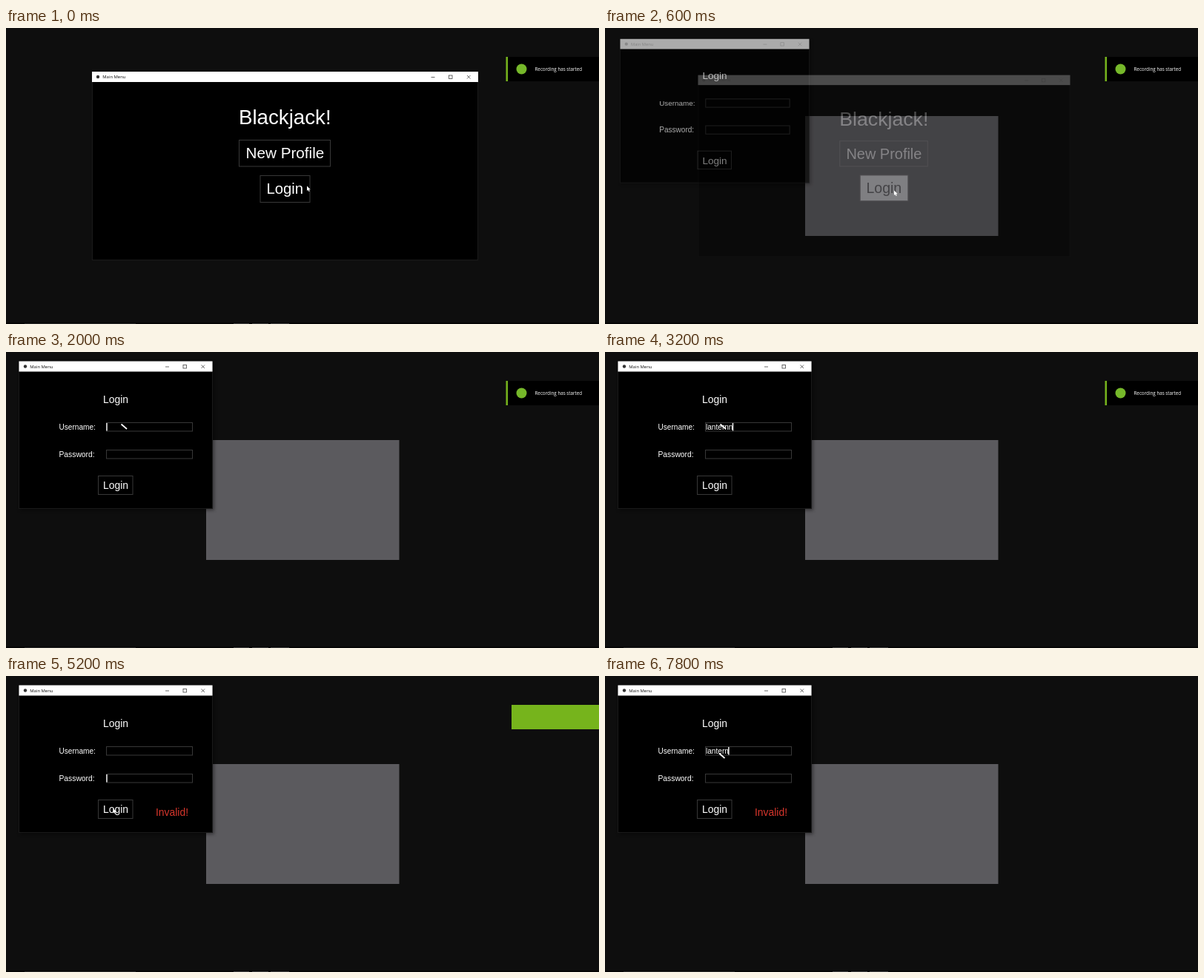
An HTML page for the animation above (8000 ms loop, 800 px wide and 400 px high).

```html
<!DOCTYPE html>
<html lang="en">
<head>
<meta charset="utf-8">
<title>Blackjack login</title>
<style>
  html, body { margin: 0; width: 100%; height: 100%; overflow: hidden; background: #0e0e0e; }
  svg { display: block; width: 800px; height: 400px; }
  text { font-family: "Liberation Sans", Arial, sans-serif; fill: #fff; white-space: pre; }
  .ui { font-family: "Open Sans", sans-serif; }
  .box { fill: #000; stroke: #383838; }
  .win { fill: #000; stroke: #1a1a1a; }
  .shade { filter: drop-shadow(2px 2px 2px rgba(0, 0, 0, .4)); }
</style>
</head>
<body>
<svg viewBox="0 0 800 400">
  <defs>
    <g id="controls" fill="none" stroke="#444" stroke-width=".8">
      <path d="M-63.500 7.500h5M-15 5l4.500 4.500m0-4.500l-4.500 4.500"/>
      <rect x="-39.500" y="5" width="4.500" height="4.500"/>
    </g>
    <g id="caption">
      <circle cx="8" cy="7" r="2.200" fill="#333"/>
      <text class="ui" x="14.300" y="9.200" font-size="5.900" style="fill:#111">Main Menu</text>
    </g>
  </defs>

  <rect width="800" height="400" fill="#0e0e0e"/>
  <rect y="398" width="800" height="2" fill="#050505"/>
  <path id="taskbar" d="M25 399.500h150" stroke="#282828"/>
  <path id="tasks" d="M307 399.500h21m4 0h22m3 0h25" stroke="#404040"/>
  <rect x="270" y="119" width="260.500" height="162" fill="#5b5a5e"/>

  <g id="login">
    <rect class="win shade" x="17.500" y="13" width="261" height="198.500"/>
    <rect x="17.500" y="12.500" width="261" height="14" fill="#fff"/>
    <g id="bar">
      <use href="#caption" x="18" y="12.500"/>
      <use href="#controls" x="278.500" y="12.500"/>
    </g>
    <text x="131" y="68.500" font-size="13.900">Login</text>
    <text x="71.500" y="104.500" font-size="10.100">Username:</text>
    <text x="71.500" y="141.500" font-size="10.300">Password:</text>
    <rect class="box" x="135.500" y="95.500" width="116" height="11.500"/>
    <rect class="box" x="135.500" y="132.500" width="116" height="11.500"/>
    <rect class="box" x="124.500" y="167.500" width="46.500" height="25"/>
    <text x="131" y="185.300" font-size="13.900">Login</text>
    <text id="typed" x="136" y="104.500" font-size="10.100"></text>
    <rect id="caret" width="1.400" height="10.500" fill="#fff"/>
    <text id="invalid" x="202" y="189" font-size="13.900" style="fill:#d8362c">Invalid!</text>
  </g>

  <g id="main">
    <rect class="win" x="116.500" y="59.500" width="520" height="254"/>
    <rect x="116" y="59" width="521" height="14" fill="#fff"/>
    <g id="mainBar">
      <use href="#caption" x="116" y="59"/>
      <use href="#controls" x="637" y="59"/>
    </g>
    <text x="314" y="130.300" font-size="27.700">Blackjack!</text>
    <rect class="box" x="314.500" y="151.500" width="123" height="35.500"/>
    <text x="323.500" y="176.200" font-size="20.700">New Profile</text>
    <rect id="button" class="box" x="343" y="199.500" width="67" height="36"/>
    <text id="buttonText" x="351.500" y="224.200" font-size="20.300">Login</text>
  </g>

  <rect id="green" y="39" width="126" height="33" fill="#76b41c"/>
  <g id="notice">
    <rect x="677" y="39" width="123" height="33"/>
    <circle cx="695.500" cy="55.500" r="7" fill="#76b82a"/>
    <text class="ui" x="713.500" y="58.200" font-size="6.270">Recording has started</text>
  </g>

  <path id="arrow" d="M0 0v6.500l1.500-1.300 1 2.300 1.200-.500-1-2.200h2z" fill="#fff"/>
  <path id="beam" d="M0 0l7.500 6.500" stroke="#fff" stroke-width="1.700"/>
</svg>
<script>
const $ = id => document.getElementById(id);
const set = (id, attrs) => { for (const k in attrs) $(id).setAttribute(k, attrs[k]); };
const show = (id, on) => set(id, { visibility: on ? "visible" : "hidden" });
// Last entry whose time has been reached
const at = (steps, t) => steps.filter(s => s[0] <= t).pop();
const scaleAt = (s, x, y) => `translate(${x} ${y}) scale(${s}) translate(${-x} ${-y})`;

const LOOP = 8000, TICK = 200, NAME = "lanternn";

// time, x, y, over a text field
const pointer = [
  [0, 406, 213.5], [200, 398, 217], [400, 390, 219.5], [1000, 265, 155],
  [1200, 155.5, 97.5, 1], [3400, 154, 116], [3600, 154, 134, 1],
  [4200, 150, 160], [4400, 144.5, 179], [5400, 150, 145], [5600, 154, 104.5, 1]
];
// time, letters shown in the user name field
const letters = [
  [0, 0], [2200, 1], [2400, 3], [2600, 5], [2800, 6], [3000, 8],
  [4600, 0], [6400, 3], [6600, 6], [7200, 7]
];
// time, row of the caret: 0 none, 1 user name, 2 password
const focus = [[0, 0], [2000, 1], [3600, 2], [5400, 0], [6200, 1]];
// time, left edge of the green strip, shift of the black panel
const slide = [[0, 674.5, 0], [5000, 674.5, 60], [5200, 682, 130], [5400, 745, 130], [5600, 801, 130]];

function draw(t) {
  const fading = t === 600;
  show("main", t <= 600);
  set("main", { opacity: fading ? .25 : 1, transform: scaleAt(fading ? .9635 : 1, 376.5, 186) });
  set("mainBar", { opacity: fading ? .2 : 1 });
  const pressed = t === 400 || fading;
  $("button").style.fill = pressed ? "#ececec" : "#000";
  $("buttonText").style.fill = pressed ? "#000" : "#fff";

  set("login", {
    opacity: t < 600 ? 0 : fading ? .65 : 1,
    transform: scaleAt(fading ? .977 : 1, 147.5, 112)
  });
  set("bar", { opacity: Math.min(1, Math.max(.2, .45 + (t - 800) / 1000)) });
  $("typed").textContent = NAME.slice(0, at(letters, t)[1]);
  const row = at(focus, t)[1];
  show("caret", row);
  set("caret", {
    x: 135.3 + (row === 1 ? $("typed").getComputedTextLength() : 0),
    y: row === 2 ? 133 : 96
  });
  set("invalid", { opacity: t >= 4600 ? 1 : 0 });

  const [, left, shift] = at(slide, t);
  set("green", { x: left });
  set("notice", { transform: `translate(${shift} 0)` });

  const tasks = t < 400 || t >= 1400;
  show("taskbar", tasks);
  show("tasks", tasks);

  const [, x, y, inField] = at(pointer, t);
  show("arrow", !inField);
  show("beam", inField);
  set(inField ? "beam" : "arrow", { transform: `translate(${x} ${y})` });
}

function frame() {
  const t = performance.now() % LOOP;
  draw(Math.floor(t / TICK) * TICK);
  requestAnimationFrame(frame);
}
frame();
</script>
</body>
</html>
```
